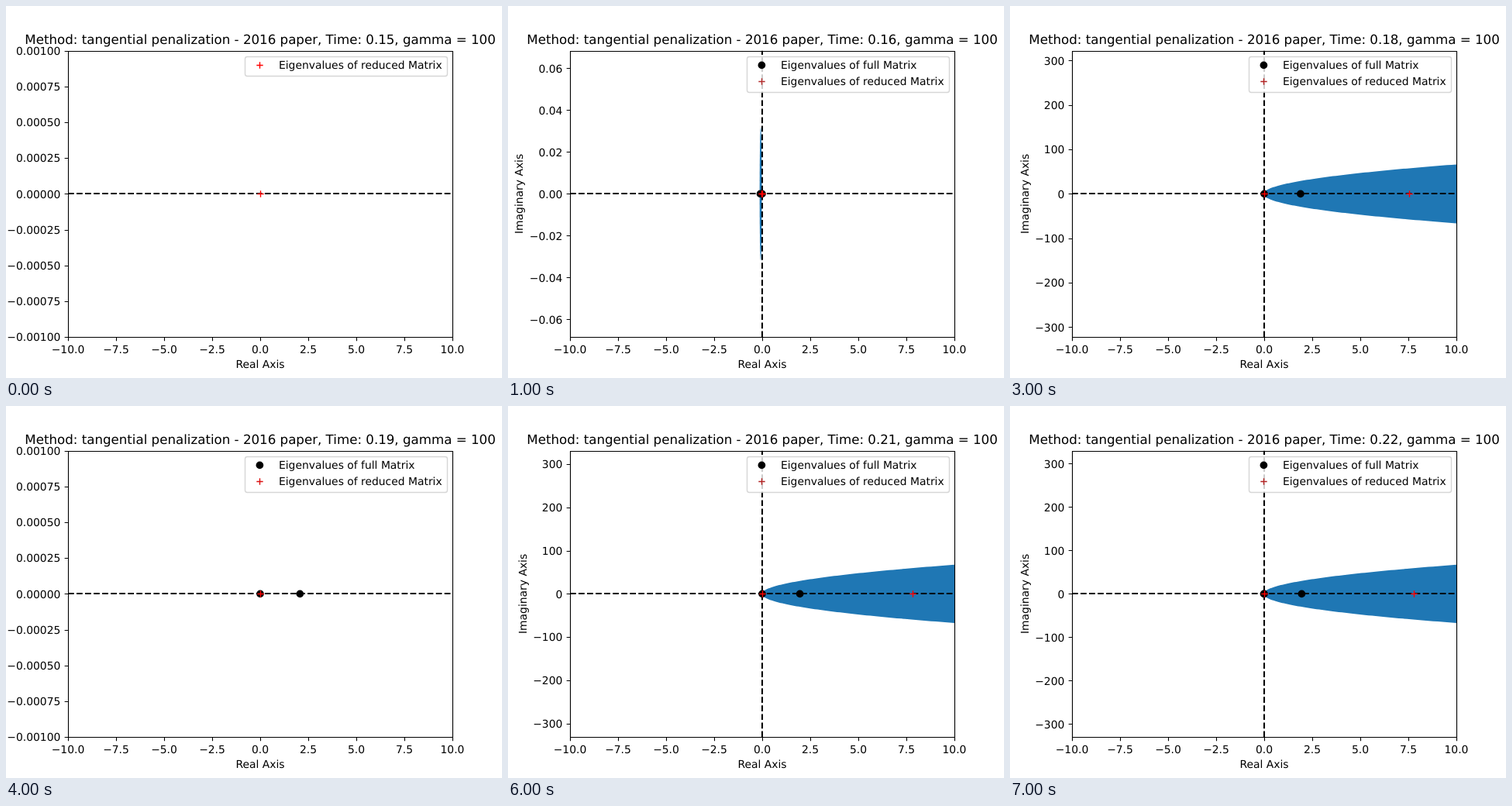
Recreate the animation shown at these times as an HTML page. Size 640 px wide and 480 px high, loop 8 s.

```html
<!DOCTYPE html>
<html lang="en">
<head>
<meta charset="utf-8">
<title>Eigenvalues over time</title>
<style>
  html, body { margin: 0; width: 100%; height: 100%; overflow: hidden; background: #fff; }
  svg { display: block; width: 640px; height: 480px; }
  text { font: 13.889px "DejaVu Sans", sans-serif; text-rendering: geometricPrecision; }
  .title { font-size: 16.667px; }
  .mid { text-anchor: middle; }
  .end { text-anchor: end; }
  .line { fill: none; stroke: #000; stroke-width: 1.11; }
  .dash { stroke: #000; stroke-width: 2.08; stroke-dasharray: 7.71 3.33; }
  .blue { fill: #1f77b4; }
</style>
</head>
<body>
<svg id="stage" viewBox="0 0 640 480"></svg>
<script>
const STEP = 1000;
const LEFT = 80, RIGHT = 576, TOP = 57.6, BOTTOM = 427.2;
const MID_X = 328, MID_Y = 242.4, HALF = 184.8;

// lim: y limit, tick: y tick spacing, dec: decimals, label: baseline of the y label
// tip, rise: blue parabola; full, reduced: eigenvalues; key: legend plus colour
const flat = { lim: 0.001, tick: 0.00025, dec: 5 };
const wide = { tick: 100, dec: 0, label: 23.5 };
const states = [
  { ...flat, full: [], reduced: [0], key: '#f00' },
  { lim: 0.06845, tick: 0.02, dec: 2, label: 18.5, sliver: true,
    full: [-0.1, 0], reduced: [-0.05, 0], key: '#b22a2a' },
  { ...wide, lim: 126.4, tick: 50, tip: 314, rise: 61.2,
    full: [-0.08, 0, 0.66], reduced: [0, 2.67], key: '#8a2f2f' },
  { ...wide, lim: 322.5, tip: 327, rise: 38,
    full: [0, 1.89], reduced: [0, 7.55], key: '#b02020' },
  { ...flat, full: [0, 2.07], reduced: [0], key: '#dc1010' },
  { ...wide, lim: 321.2, tip: 327.5, rise: 38,
    full: [0, 1.87], reduced: [0], key: '#c81818' },
  { ...wide, lim: 331, tip: 327.5, rise: 37.6,
    full: [0, 1.96], reduced: [0, 7.82], key: '#b02020' },
  { ...wide, lim: 330, tip: 327, rise: 37.6,
    full: [-0.02, 0, 1.95], reduced: [0, 7.79], key: '#b02020' }
];

const px = v => MID_X + v * 24.8;
const crisp = v => Math.round(v) + 0.5;
const num = (v, dec) => (v < 0 ? '\u2212' : '') + Math.abs(v).toFixed(dec);
const text = (x, y, s, cls = '') => `<text x="${x}" y="${y}" class="${cls}">${s}</text>`;
const path = (d, cls) => `<path d="${d}" class="${cls}"/>`;
const dot = (x, y) => `<circle cx="${x}" cy="${y}" r="4.86"/>`;
const plus = (x, y, color = '#f00') =>
  `<path d="M${x - 4.17} ${y}h8.34M${x} ${y - 4.17}v8.34" stroke="${color}" stroke-width="1.39"/>`;

function region(s) {
  if (s.sliver) return '<ellipse cx="326.1" cy="242.4" rx="1.4" ry="86" class="blue"/>';
  if (!s.tip) return '';
  const upper = [], lower = [], n = 80;
  for (let i = 0; i <= n; i++) {
    const u = i / n;
    const x = s.tip + (RIGHT - s.tip) * u * u;
    upper.push(`${x} ${MID_Y - s.rise * u}`);
    lower.unshift(`${x} ${MID_Y + s.rise * u}`);
  }
  return path('M' + upper.concat(lower).join('L') + 'Z', 'blue');
}

function axes(s) {
  let out = '', ticks = '';
  for (let i = -4; i <= 4; i++) {
    const x = px(i * 2.5);
    ticks += `M${crisp(x)} 427.5v4.86`;
    out += text(x, 448, num(i * 2.5, 1), 'mid');
  }
  const n = Math.floor(s.lim / s.tick + 1e-6);
  for (let i = -n; i <= n; i++) {
    const v = i * s.tick, y = MID_Y - v / s.lim * HALF;
    ticks += `M80.5 ${crisp(y)}h-4.86`;
    out += text(70.3, y + 5.2, num(v, s.dec), 'end');
  }
  out += path(ticks + 'M80.5 58.5H576.5V427.5H80.5Z', 'line');
  out += text(MID_X, 467, 'Real Axis', 'mid');
  if (s.label) {
    out += `<g transform="translate(${s.label} ${MID_Y}) rotate(-90)">${text(0, 0, 'Imaginary Axis', 'mid')}</g>`;
  }
  return out;
}

function legend(s) {
  const two = s.full.length > 0;
  let out = `<rect x="308.5" y="65.5" width="261" height="${two ? 46 : 25}" rx="2.8"
    fill="#fff" fill-opacity=".8" stroke="#ccc" stroke-opacity=".8" stroke-width="1.39"/>`;
  if (two) out += dot(327.4, 76.4) + text(352, 81.3, 'Eigenvalues of full Matrix');
  const y = two ? 97.5 : 76.5;
  return out + plus(327.5, y, s.key) + text(352, y + 4.8, 'Eigenvalues of reduced Matrix');
}

function draw(s, i) {
  const time = +(0.15 + i * 0.01).toFixed(2);
  return `<g visibility="hidden">
    <g clip-path="url(#plot)">
      ${region(s)}
      ${path(`M${LEFT} 242H${RIGHT}`, 'dash')}
      ${s.label ? path(`M${MID_X} ${BOTTOM}V${TOP}`, 'dash') : ''}
      ${s.full.map(v => dot(px(v), MID_Y)).join('')}
      ${s.reduced.map(v => plus(crisp(px(v)), 242.5)).join('')}
    </g>
    ${axes(s)}${legend(s)}
    ${text(MID_X, 49.4, `Method: tangential penalization - 2016 paper, Time: ${time}, gamma = 100`, 'title mid')}
  </g>`;
}

const stage = document.getElementById('stage');
stage.innerHTML = `<clipPath id="plot"><rect x="${LEFT}" y="${TOP}" width="${RIGHT - LEFT}"
  height="${BOTTOM - TOP}"/></clipPath>` + states.map(draw).join('');
const views = [...stage.children].slice(1);

const start = performance.now();
let shown = -1;
function tick() {
  const i = Math.floor((performance.now() - start) / STEP) % states.length;
  if (i !== shown) {
    views.forEach((view, k) => view.setAttribute('visibility', k === i ? 'visible' : 'hidden'));
    shown = i;
  }
  requestAnimationFrame(tick);
}
tick();
</script>
</body>
</html>
```
